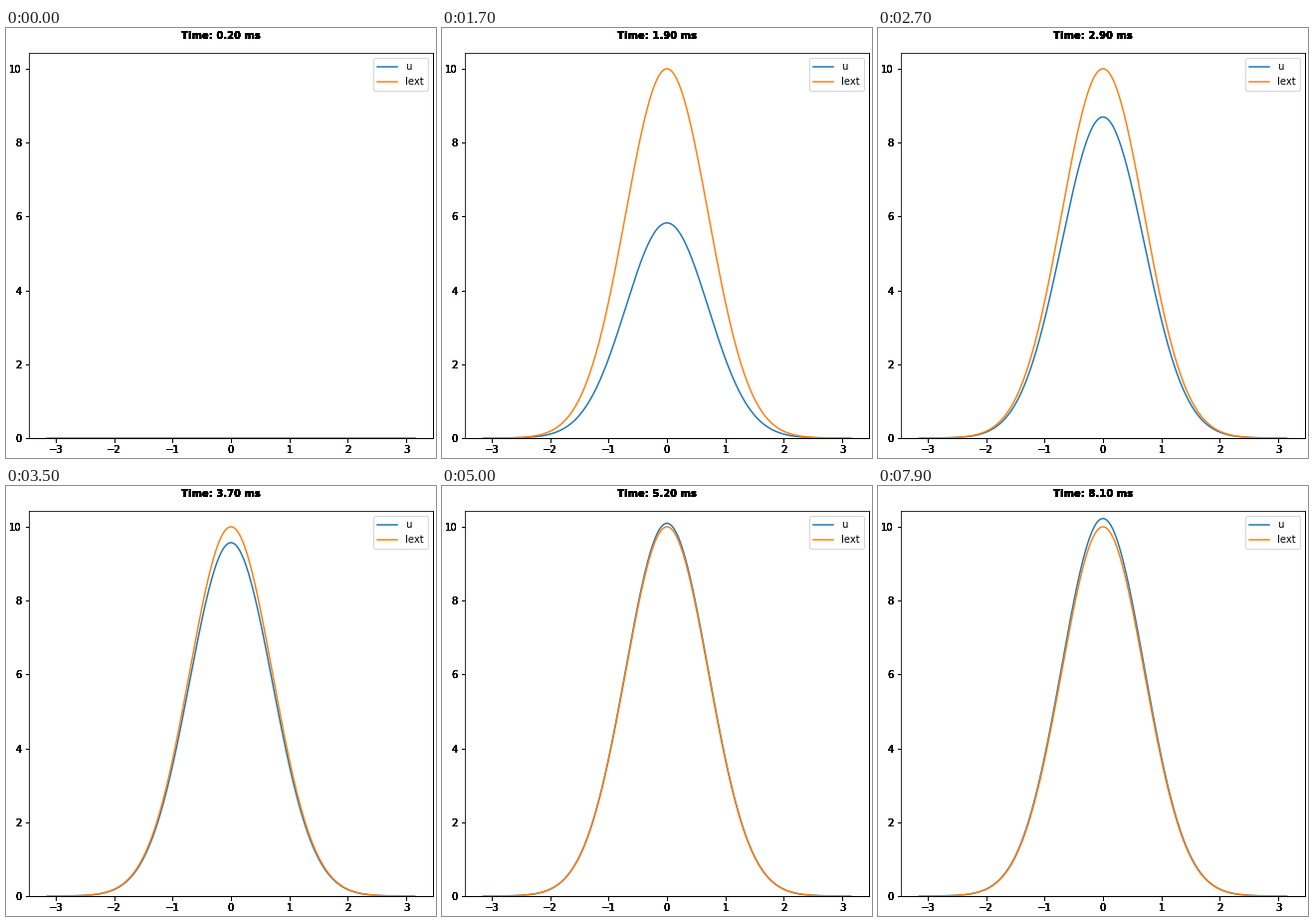
These frames come from a looping animation (432x432 px, 8000 ms). A matplotlib script:

```python
import numpy as np
import matplotlib.pyplot as plt
from matplotlib.animation import FuncAnimation

SIZE, DPI = 432, 72
FRAMES, INTERVAL = 80, 100
ONSET = 9        # step at which the stimulus is switched on
DECAY = 0.9      # explicit Euler step with dt / tau = 0.1
GAIN = 1.023     # steady response relative to the stimulus
LAYERS = 6       # stacked axes give the heavy, repeatedly inked labels

plt.rcParams.update({"font.family": "DejaVu Sans", "font.size": 10})

x = np.linspace(-np.pi, np.pi, 500)
stimulus = 10 * np.exp(-x**2)

fig = plt.figure(figsize=(SIZE / DPI, SIZE / DPI), dpi=DPI, facecolor="white")
left, right, bottom, top = 23, 429, 20, 407
rect = [left / SIZE, bottom / SIZE, (right - left) / SIZE, (top - bottom) / SIZE]


def add_layer(i):
    ax = fig.add_axes(rect, label=f"layer{i}")
    ax.set_xlim(-1.1 * np.pi, 1.1 * np.pi)
    ax.set_ylim(0, 10.43)
    ax.set_xticks(range(-3, 4))
    ax.set_yticks(range(0, 11, 2))
    return ax


ax = [add_layer(i) for i in range(LAYERS)][-1]
titles = [
    fig.text(0.5, 421 / SIZE, "", ha="center", va="baseline", weight="bold")
    for _ in range(LAYERS)
]
u_line, = ax.plot(x, 0 * x, color="C0", label="u")
i_line, = ax.plot(x, 0 * x, color="C1", label="Iext")
ax.legend(loc="upper right")


def update(k):
    steps = max(k - ONSET, 0)
    u_line.set_ydata(GAIN * (1 - DECAY**steps) * stimulus)
    i_line.set_ydata(stimulus * (k >= ONSET))
    for title in titles:
        title.set_text(f"Time: {0.2 + 0.1 * k:.2f} ms")
    return [u_line, i_line, *titles]


anim = FuncAnimation(fig, update, frames=FRAMES, interval=INTERVAL,
                     repeat=True, blit=False)
plt.show()
```
